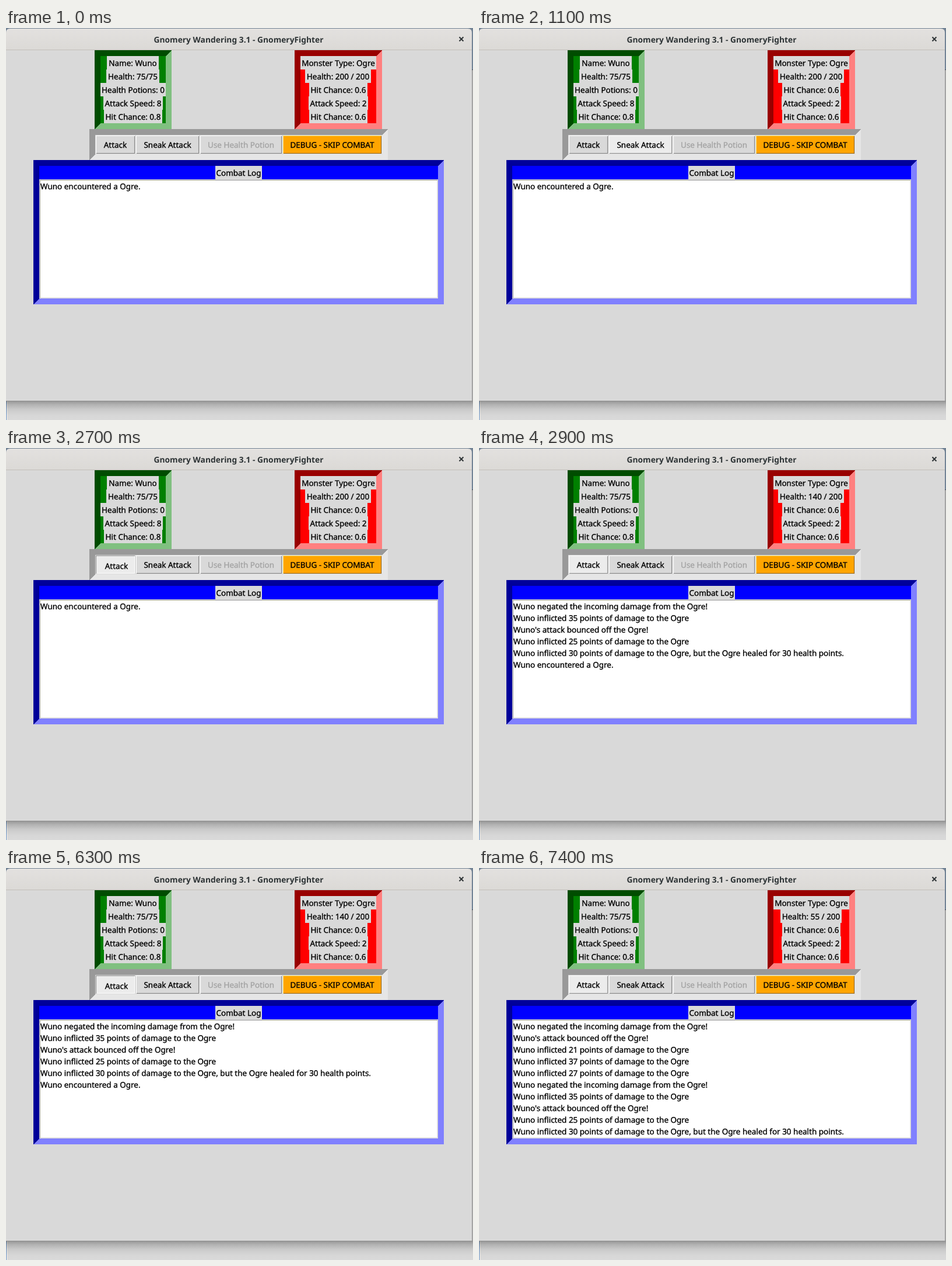
These frames come from a looping animation (801 px wide and 671 px high, 8 s). An HTML page:

```html
<!DOCTYPE html>
<html lang="en">
<head>
<meta charset="utf-8">
<title>Combat</title>
<style>
  html, body { margin: 0; width: 100%; height: 100%; overflow: hidden; background: #d9d9d9; }
  svg { display: block; width: 801px; height: 671px; }
  rect, polygon { shape-rendering: crispEdges; }
  text {
    font: 13.49px "Noto Sans", "Open Sans", sans-serif;
    text-rendering: geometricPrecision;
    fill: #000; stroke: #000; stroke-width: .35px;
    white-space: pre;
  }
  .mid { text-anchor: middle; }
  .off { fill: #a3a3a3; stroke: #a3a3a3; }
  .title { font-size: 13.8px; font-weight: 700; fill: #2e3436; stroke: none; }
</style>
</head>
<body>
<svg id="stage" viewBox="0 0 801 671" xmlns="http://www.w3.org/2000/svg">
  <defs>
    <linearGradient id="bar" x2="0" y2="1">
      <stop stop-color="#e3e1df"/><stop offset="1" stop-color="#dbd9d6"/>
    </linearGradient>
    <linearGradient id="shadow" x2="0" y2="1">
      <stop stop-color="#000" stop-opacity=".32"/>
      <stop offset=".2" stop-color="#000" stop-opacity=".18"/>
      <stop offset=".45" stop-color="#000" stop-opacity=".07"/>
      <stop offset=".75" stop-color="#000" stop-opacity=".01"/>
      <stop offset="1" stop-color="#000" stop-opacity="0"/>
    </linearGradient>
  </defs>
</svg>
<script>
const HERO = "Wuno";
const GREY = "#d9d9d9", LOOP = 8000;
const stage = document.getElementById("stage");

function add(tag, attrs, content = "") {
  const node = document.createElementNS(stage.namespaceURI, tag);
  for (const key in attrs) node.setAttribute(key, attrs[key]);
  node.textContent = content;
  return stage.appendChild(node);
}
const rect = (x, y, width, height, fill) => add("rect", { x, y, width, height, fill });
const text = (x, y, content, cls = "mid") => add("text", { x, y, class: cls }, content);

// Sunken frame: dark top and left, light bottom and right, mitred corners.
function frame(x, y, w, h, base, dark, light) {
  const b = 10, r = x + w, d = y + h;
  rect(x, y, w, h, light);
  add("polygon", { fill: dark, points:
    `${x},${y} ${r},${y} ${r - b},${y + b} ${x + b},${y + b} ${x + b},${d - b} ${x},${d}` });
  rect(x + b, y + b, w - 2 * b, h - 2 * b, base);
}

function label(cx, y, width, content) {
  const box = rect(0, y, 0, 23, GREY);
  const caption = text(0, y + 17, "");
  const show = (newWidth, newContent) => {
    const left = Math.floor(cx - newWidth / 2);
    box.setAttribute("x", left);
    box.setAttribute("width", newWidth);
    caption.setAttribute("x", left + newWidth / 2);
    caption.textContent = newContent;
  };
  show(width, content);
  return show;
}

const LOOKS = {
  normal: { fill: GREY, light: "#fff", dark: "#828282", shift: 0 },
  hover: { fill: "#ececec", light: "#fff", dark: "#8e8e8e", shift: 0 },
  pressed: { fill: "#ececec", light: "#8e8e8e", dark: "#fff", shift: 2 },
  orange: { fill: "#ffa500", light: "#ffe780", dark: "#996300", shift: 0 }
};

function button(x, width, content, look = "normal", cls = "mid") {
  const y = 184, h = 31;
  const light = rect(x, y, width, h);
  const dark = rect(x + 1, y + 1, width - 1, h - 1);
  const face = rect(x + 1, y + 1, width - 2, h - 2);
  const caption = text(x + width / 2, 205, content, cls);
  const show = name => {
    const style = LOOKS[name];
    dark.setAttribute("fill", style.dark);
    light.setAttribute("fill", style.light);
    face.setAttribute("fill", style.fill);
    caption.setAttribute("transform", `translate(${style.shift} ${style.shift})`);
  };
  show(look);
  return show;
}

// Desktop, window and title bar
rect(0, 0, 801, 671, GREY);
rect(0, 0, 801, 71, "#728395");
rect(799, 71, 2, 1, "#4c5560");
rect(799, 72, 1, 566, "#9a9a9a");
rect(800, 72, 1, 566, "#adadad");
rect(0, 638, 1, 33, "#6c94c4");
rect(1, 638, 1, 33, "#eeeeee");
rect(0, 638, 801, 33, "url(#shadow)");
add("path", { d: "M0 38V8Q0 1 7 1H792Q799 1 799 8V38Z", fill: "url(#bar)" });
rect(0, 37, 799, 1, "#c3bfba");
rect(0, 38, 799, 600, GREY);
rect(0, 638, 800, 1, "#8f8f8f");
text(399, 25, "Gnomery Wandering 3.1 - GnomeryFighter", "mid title");
add("path", { d: "M777.5 15.5l7 7m0-7l-7 7", stroke: "#2e3436", "stroke-width": 2 });

// Fighter panels
frame(152, 38, 132, 135, "#008000", "#004c00", "#80c080");
[[89, `Name: ${HERO}`], [91, "Health: 75/75"], [112, "Health Potions: 0"],
 [102, "Attack Speed: 8"], [100, "Hit Chance: 0.8"]]
  .forEach(([width, content], i) => label(218, 48 + 23 * i, width, content));

frame(495, 38, 150, 135, "#ff0000", "#990000", "#ff8080");
const [, monsterHealth] =
  [[130, "Monster Type: Ogre"], [113, "Health: 200 / 200"], [100, "Hit Chance: 0.6"],
   [102, "Attack Speed: 2"], [100, "Hit Chance: 0.6"]]
    .map(([width, content], i) => label(570, 48 + 23 * i, width, content));

// Actions
frame(143, 173, 512, 53, GREY, "#999999", "#e6e6e6");
const attack = button(154, 67, "Attack");
const sneak = button(223, 108, "Sneak Attack");
button(333, 140, "Use Health Potion", "normal", "mid off");
button(475, 169, "DEBUG - SKIP COMBAT", "orange");

// Combat log
frame(47, 226, 704, 247, "#0000ff", "#000099", "#8080ff");
label(399, 236, 80, "Combat Log");
rect(57, 259, 684, 204, GREY);
rect(58, 260, 682, 202, "#999999");
rect(59, 261, 681, 201, "#e6e6e6");
rect(59, 261, 680, 200, "#fff");
const rows = Array.from({ length: 10 }, (_, i) => text(59, 276 + 20 * i, "", ""));

const hit = points => `${HERO} inflicted ${points} points of damage to the Ogre`;
const negated = `${HERO} negated the incoming damage from the Ogre!`;
const bounced = `${HERO}'s attack bounced off the Ogre!`;
const opening = [`${HERO} encountered a Ogre.`];
const firstRound = [negated, hit(35), bounced, hit(25),
  `${hit(30)}, but the Ogre healed for 30 health points.`, ...opening];
const secondRound = [negated, bounced, hit(21), hit(37), hit(27), ...firstRound];

// Latest step whose start has passed; steps are [start, value].
const at = (steps, t) => steps.filter(([start]) => start <= t).pop()[1];

const attackSteps = [[0, "normal"], [1700, "hover"], [2700, "pressed"], [2900, "hover"],
  [6300, "pressed"], [6500, "hover"]];
const sneakSteps = [[0, "normal"], [1100, "hover"], [1700, "normal"]];
const rounds = [
  [0, { health: 200, width: 113, log: opening }],
  [2900, { health: 140, width: 113, log: firstRound }],
  [6500, { health: 55, width: 105, log: secondRound }]
];

function render(t) {
  attack(at(attackSteps, t));
  sneak(at(sneakSteps, t));
  const { health, width, log } = at(rounds, t);
  monsterHealth(width, `Health: ${health} / 200`);
  rows.forEach((row, i) => { row.textContent = log[i] || ""; });
}

const begin = performance.now();
function tick() {
  render((performance.now() - begin) % LOOP);
  requestAnimationFrame(tick);
}
tick();
</script>
</body>
</html>
```
